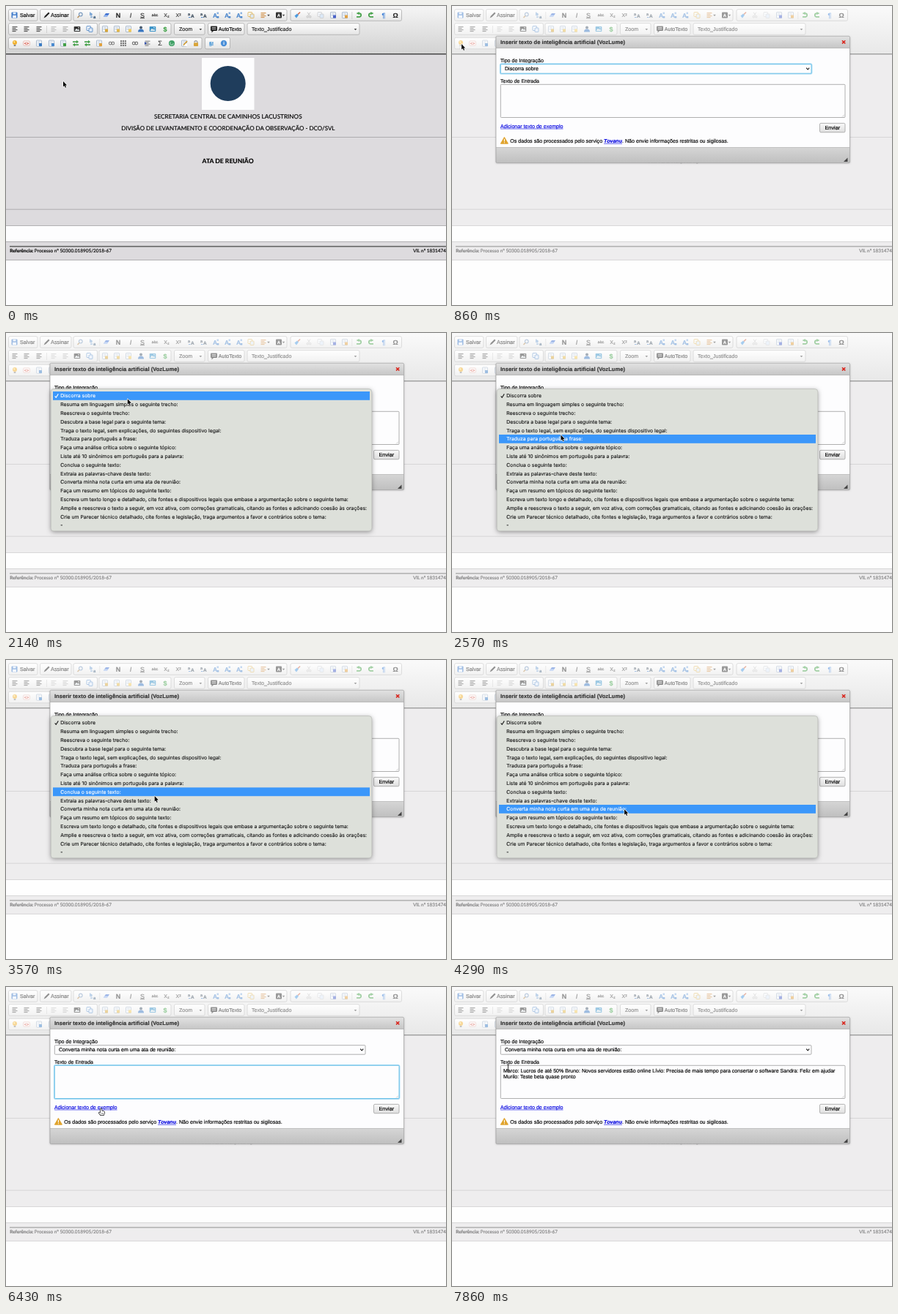
Write an HTML page with a canvas that moves like this. It is 600x409 px and loops after 8000 ms.

```html
<!DOCTYPE html>
<html lang="pt-BR">
<head>
<meta charset="utf-8">
<title>Editor</title>
<style>
html, body { margin: 0; width: 100%; height: 100%; overflow: hidden; background: #fdfdfe; }
canvas { display: block; width: 600px; height: 409px; }
</style>
</head>
<body>
<canvas id="stage"></canvas>
<script>
const W = 600, H = 409, LOOP = 8000, STEP = 1000 / 7;
const SANS = '"Liberation Sans", Arial, sans-serif';
const MENU = 'Inter, sans-serif';
const DOC = 'Lato, sans-serif';

const canvas = document.getElementById('stage');
const ctx = canvas.getContext('2d');
const dpr = window.devicePixelRatio || 1;
canvas.width = W * dpr;
canvas.height = H * dpr;
ctx.textRendering = 'geometricPrecision';
ctx.lineJoin = 'round';

const OPEN = 860, MENU_ON = 2140, MENU_OFF = 4710, CHOSEN = 5000, FILLED = 6710;

// time, x, y of the pointer hot spot
const PATH = [
  [0, 78, 103], [140, 78, 103], [570, 13, 52], [860, 13, 52],
  [1570, 169, 81], [2000, 169, 81], [2570, 148.5, 139.5], [3140, 170, 168],
  [4000, 235, 204], [4860, 235.5, 204.5], [5290, 235.5, 204.5],
  [6290, 129, 166.5], [6860, 129, 166.5], [7570, 76.5, 110], [8000, 76.5, 110]
];

const OPTIONS = [
  'Discorra sobre',
  'Resuma em linguagem simples o seguinte trecho:',
  'Reescreva o seguinte trecho:',
  'Descubra a base legal para o seguinte tema:',
  'Traga o texto legal, sem explicações, do seguintes dispositivo legal:',
  'Traduza para português a frase:',
  'Faça uma análise crítica sobre o seguinte tópico:',
  'Liste até 10 sinônimos em português para a palavra:',
  'Conclua o seguinte texto:',
  'Extraia as palavras-chave deste texto:',
  'Converta minha nota curta em uma ata de reunião:',
  'Faça um resumo em tópicos do seguinte texto:',
  'Escreva um texto longo e detalhado, cite fontes e dispositivos legais que embase a argumentação sobre o seguinte tema:',
  'Amplie e reescreva o texto a seguir, em voz ativa, com correções gramaticais, citando as fontes e adicinando coesão às orações:',
  'Crie um Parecer técnico detalhado, cite fontes e legislação, traga argumentos a favor e contrários sobre o tema:',
  '-'
];

const ROWS = [
  [12.5, `101 lens #7d9cc0;118 swap #3f7fc4;137 eraser #3d6fd0;153 N #222 bold;170 I #333 italic;
    186 S #333 under;203 abc #444 strike;219 X₂ #333;235 X² #333;252 pair #345;269 pair #345;
    286 style #4a86cc;302 style #4a86cc;318 style #4a86cc;334 copy #e0b04a;351 lines #d08a3c;372 box #333;
    397 brush #4c9be0;413 cut #ccc;429 copy #ccc;446 page #4a62c8;462 page #e0a040;
    481 undo #43a047;498 redo #43a047;515 ¶ #3d7fd6;531 Ω #222 bold`],
  [31.5, `12 lines #444;28 lines #444;45 lines #444;65 lines #bbb;81 lines #aaa;97 pic #333;114 copy #4a80c0;
    135 page #d6a63a;151 page #e2b84c;167 page #f0c95c;184 person #3b78c2;200 pic #3c94c8;217 $ #3da045 bold`],
  [51, `12 bulb #f0b030;28 tag #d04a3a;45 page #3b7cc4;62 page #4a8bd0;78 page #43a047;95 cycle #43a047;
    111 cycle #43a047;127 page #e2a13c;144 chain #888;160 grid #777;176 chain #777;193 indent #3050b0;
    210 Σ #333;226 ball #3fa065;243 pen #d09a30;259 lock #d9a53a;280 §! #2a86d0 bold;297 info #4a8fd8`]
].map(([y, list]) => [y, list.split(';').map(s => s.trim().split(' '))]);

// a hairline stroke gives the slightly heavy screen rendering
function text(s, x, y, size, color = '#000', font = SANS, style = '', align = 'left') {
  ctx.font = `${style} ${size}px ${font}`;
  ctx.fillStyle = ctx.strokeStyle = color;
  ctx.lineWidth = 0.16;
  ctx.textAlign = align;
  ctx.fillText(s, x, y + size * 0.36);
  ctx.strokeText(s, x, y + size * 0.36);
  return ctx.measureText(s).width;
}

function rect(x, y, w, h, color) {
  ctx.fillStyle = color;
  ctx.fillRect(x, y, w, h);
}

function shade(y, h, top, bottom) {
  const g = ctx.createLinearGradient(0, y, 0, y + h);
  g.addColorStop(0, top);
  g.addColorStop(1, bottom);
  return g;
}

function box(x, y, w, h, r, fill, stroke, line = 0.8) {
  ctx.beginPath();
  ctx.roundRect(x, y, w, h, r);
  ctx.fillStyle = fill;
  ctx.fill();
  if (!stroke) return;
  ctx.strokeStyle = stroke;
  ctx.lineWidth = line;
  ctx.stroke();
}

function poly(points, fill, stroke, line = 1) {
  ctx.beginPath();
  for (let i = 0; i < points.length; i += 2) ctx.lineTo(points[i], points[i + 1]);
  if (fill) ctx.closePath();
  if (stroke) {
    ctx.strokeStyle = stroke;
    ctx.lineWidth = line;
    ctx.stroke();
  }
  if (fill) {
    ctx.fillStyle = fill;
    ctx.fill();
  }
}

function disc(x, y, r, fill) {
  ctx.beginPath();
  ctx.arc(x, y, r, 0, 7);
  ctx.fillStyle = fill;
  ctx.fill();
}

function ring(x, y, r, color, from = 0, to = 7, line = 1.2) {
  ctx.beginPath();
  ctx.arc(x, y, r, from, to);
  ctx.strokeStyle = color;
  ctx.lineWidth = line;
  ctx.stroke();
}

// icons are drawn around 0,0
const ICONS = {
  lens(c) { ring(0.8, -1, 2.3, c); poly([-1, 1, -3.5, 3.5], null, '#b58b55', 1.4); },
  swap(c) { text('b', -4, -1.5, 6, c, SANS, 'bold'); text('a', 1, 2, 6, '#357', SANS, 'bold'); poly([-3, 2.5, 0, 2.5], null, c); },
  pair(c) { text('a', -4, -1.5, 5.5, c, SANS, 'bold'); text('A', 0, 1.2, 6.5, c, SANS, 'bold'); rect(-3, 2.5, 2.5, 1, '#4a86cc'); },
  style(c) { text('A', -1, 0.5, 8.5, c, SANS, 'bold', 'center'); rect(1.5, -4, 2.5, 2.5, '#8ab2e2'); rect(1.5, 1.5, 2.8, 2.5, c); },
  eraser(c) { poly([-4, 2, -1, -2.5, 4, -2.5, 1, 2], c); poly([-4, 2, -2.5, 0, 2.3, 0, 1, 2], '#9dbcf0'); },
  page(c) {
    box(-3.5, -4, 7, 8, 0.6, '#fafcff', '#8aa0b8', 0.7);
    for (let i = 0; i < 3; i++) rect(-2.3, -2.5 + i * 1.7, 4.5, 0.6, '#a9b9cb');
    rect(0, 0, 4, 4, c);
  },
  copy(c) { box(-4, -4, 5.5, 6, 0.6, '#f3f7fc', c); box(-1, -1.5, 5, 5.5, 0.6, '#dbe8f7', c); },
  lines(c) { for (let i = 0; i < 4; i++) rect(-3.5, -3.4 + i * 2, i % 2 ? 5 : 7, 1, c); },
  indent(c) { ICONS.lines('#777'); poly([-4, -2, -1, 0, -4, 2], c); },
  box(c) { box(-4, -4, 8, 8, 1, c); text('A', 0, 0, 6, '#fff', SANS, 'bold', 'center'); },
  brush(c) { poly([-3.5, 1, 0, -2, 2, 0, -1, 4], c); poly([1, -1, 4, -4], null, '#d06b4c', 1.6); },
  cut(c) { ring(-1.8, 2.2, 1.2, c); ring(1.8, 2.2, 1.2, c); poly([-1.5, 1, 2, -4], null, c); poly([1.5, 1, -2, -4], null, c); },
  undo(c) { ring(0.8, 0, 2.4, c, -1.6, 1.6, 1.7); rect(-3, 1.55, 4, 1.7, c); poly([0.8, -4.6, 0.8, -0.4, -3.5, -2.4], c); },
  redo(c) { ctx.scale(-1, 1); ICONS.undo(c); },
  cycle(c) {
    for (let i = 0; i < 2; i++) {
      rect(-4, -2.8, 5, 1.6, c);
      poly([1, -4.2, 1, 0.2, 4.2, -2], c);
      ctx.rotate(Math.PI);
    }
  },
  pic(c) { box(-4.3, -3.5, 8.6, 7, 0.7, c); poly([-3.5, 2.6, -1, -0.8, 0.7, 1, 2, 0, 3.6, 2.6], '#e8eef0'); disc(2, -1.7, 0.8, '#fff'); },
  person(c) { disc(0, -2, 2, '#4b5d70'); ctx.beginPath(); ctx.arc(0, 4, 4, Math.PI, 0); ctx.fillStyle = c; ctx.fill(); },
  bulb(c) { disc(0, -1, 3, c); disc(-0.7, -1.8, 1, '#fff2b0'); rect(-1.3, 2, 2.6, 2, '#888'); },
  tag(c) { box(-4.3, -3, 8.6, 6, 1, '#fff', '#e0a9a0'); text('<>', 0, 0, 5.5, c, SANS, 'bold', 'center'); },
  chain(c) { ring(-1.8, 0, 1.8, c); ring(1.8, 0, 1.8, c); },
  grid(c) { for (let i = 0; i < 9; i++) rect(-4 + i % 3 * 2.9, -4 + Math.floor(i / 3) * 2.9, 2.1, 2.1, c); },
  ball(c) { disc(0, 0, 4, c); ring(0, 0, 2.2, '#cfe8df', 0, 4, 0.8); },
  pen(c) { ICONS.page('#fff'); poly([-1, 2.5, 4, -3], null, c, 1.7); },
  lock(c) { ring(0, -1.2, 2.1, '#999', Math.PI, 7); box(-3, -0.8, 6, 4.8, 0.7, c); },
  info(c) { disc(0, 0, 4.2, c); text('i', 0, 0, 6, '#fff', SANS, 'bold', 'center'); }
};

function icon(x, y, kind, color, style) {
  ctx.save();
  ctx.translate(x, y);
  if (ICONS[kind]) ICONS[kind](color);
  else {
    const face = style === 'bold' || style === 'italic' ? style : '';
    text(kind, 0, 0, kind.length > 2 ? 5.2 : kind.length > 1 ? 7 : 9, color, SANS, face, 'center');
    if (style === 'under') rect(-3, 3.8, 6, 0.8, color);
    if (style === 'strike') rect(-4.5, 0.4, 9, 0.6, color);
  }
  ctx.restore();
}

function group(x, y, w) {
  box(x, y - 7.8, w, 15.6, 2, shade(y - 8, 16, '#fff', '#e4e4e4'), '#adadad');
}

function caret(x, y) {
  poly([x - 1.8, y - 0.9, x + 1.8, y - 0.9, x, y + 1.3], '#444');
}

function toolbar() {
  rect(0, 0, W, 65, shade(0, 65, '#f5f5f5', '#d2d2d2'));
  rect(0, 65, W, 1.4, '#3c3c3c');
  [[3.5, 39.5], [46.5, 42.5], [92, 291], [388, 151.5]].forEach(([x, w]) => group(x, 12.5, w));
  [[3.5, 121], [127, 98], [229.5, 41.5], [275.5, 49.5], [329, 153]].forEach(([x, w]) => group(x, 31.5, w));
  [[3.5, 263.5], [271.5, 34]].forEach(([x, w]) => group(x, 51, w));
  rect(127.5, 8, 0.7, 10, '#c4c4c4');
  rect(471.5, 8, 0.7, 10, '#c4c4c4');
  rect(55, 27, 0.7, 10, '#c4c4c4');

  box(7.5, 8.5, 8, 8, 1, '#3c78c8');
  rect(9.5, 8.8, 4, 2.6, '#dbe9fa');
  rect(9, 12.8, 5, 3.5, '#f4f8fd');
  text('Salvar', 19, 12.5, 7.2);
  poly([51.5, 16.5, 53, 13.5, 58, 8.5, 59.5, 10, 54.5, 15], '#222');
  text('Assinar', 61, 12.5, 7.4);

  ROWS.forEach(([y, list]) => list.forEach(([x, ...rest]) => icon(+x, y, ...rest)));
  caret(358, 12.7);
  caret(378.5, 12.7);
  text('Zoom', 236, 31.5, 7.1, '#222');
  caret(265.3, 32);
  box(279, 27.5, 9, 6.5, 1, '#222');
  poly([280.5, 33, 280.5, 36.5, 284, 33], '#222');
  rect(280.7, 29.3, 5.6, 0.7, '#fff');
  rect(280.7, 31.2, 5.6, 0.7, '#fff');
  text('AutoTexto', 289.7, 31.5, 7.1);
  text('Texto_Justificado', 335, 31.5, 7.1, '#222');
  caret(476.5, 32);
}

function page() {
  rect(0, 0, W, H, '#fdfdfe');
  rect(0, 66, W, 281, '#dddbde');
  rect(0, 300, W, 22.5, '#fdfdfe');
  [179, 277.7, 300, 322, 347].forEach(y => rect(0, y, W, 0.9, '#a9a8aa'));
  rect(5, 328, W, 1.8, '#747474');

  rect(267, 71, 71.5, 71, '#fdfdfe');
  disc(302.7, 106, 24, '#1f3d5c');
  text('SECRETARIA CENTRAL DE CAMINHOS LACUSTRINOS', 302.8, 150.7, 8.2, '#000', DOC, '', 'center');
  text('DIVISÃO DE LEVANTAMENTO E COORDENAÇÃO DA OBSERVAÇÃO - DCO/SVL', 302.8, 166.7, 8, '#000', DOC, '', 'center');
  text('ATA DE REUNIÃO', 302.6, 211.5, 8.6, '#000', DOC, 'bold', 'center');

  const w = text('Referência: ', 5.3, 335, 6.45, '#000', DOC, 'bold');
  text('Processo nº 50300.018905/2018-67', 5.3 + w, 335, 6.45, '#000', DOC);
  text('VIL nº 1831474', 600, 335, 6.45, '#000', DOC, '', 'right');
}

function field(x, y, w, h, focus) {
  if (focus) box(x - 0.3, y - 0.3, w + 0.6, h + 0.6, 1.5, '#fff', '#a9dcf5', 2.2);
  box(x, y, w, h, 1, '#fdfdfe', focus ? '#55b5e3' : '#9c9c9c', 0.8);
}

function link(s, x, y, style) {
  const w = text(s, x, y, 7.1, '#0000e0', SANS, style);
  rect(x, y + 3.5, w, 0.6, '#0000e0');
  return w;
}

function dialog(t) {
  const x0 = 60, y0 = 41.3, w = 482.5, h = 173.2;
  ctx.save();
  ctx.shadowColor = 'rgba(0,0,0,.35)';
  ctx.shadowBlur = 2.5 * dpr;
  ctx.shadowOffsetY = 0.6 * dpr;
  box(x0, y0, w, h, 1.5, '#fdfdfe');
  ctx.restore();
  rect(x0, y0, w, 16, shade(y0, 16, '#e2e2e2', '#c6c6c6'));
  rect(x0, 57, w, 0.7, '#a5a5a5');
  rect(x0, 193.3, w, 21.2, shade(193, 21, '#d6d6d6', '#c0c0c0'));
  rect(x0, 193, w, 0.7, '#b5b5b5');
  box(x0, y0, w, h, 1.5, 'transparent', '#a2a2a2', 0.7);
  poly([539.5, 207.5, 539.5, 213, 534, 213], '#444');

  text('Inserir texto de inteligência artificial (VozLume)', 66, 49.2, 7.6, '#333', SANS, 'bold');
  poly([532, 47.2, 536.3, 51.4], null, '#d9251c', 1.5);
  poly([536.3, 47.2, 532, 51.4], null, '#d9251c', 1.5);

  const chosen = t >= CHOSEN, filled = t >= FILLED;
  text('Tipo de Integração', 66, 74.6, 7.1);
  field(66.3, 79.7, 423.7, 12.5, !chosen);
  text(OPTIONS[chosen ? 10 : 0], 72, 85.7, 7.05);
  poly([483.2, 84.7, 485.2, 87, 487.2, 84.7], null, '#111', 1.1);

  text('Texto de Entrada', 66, 102.5, 7);
  field(66.3, 107.3, 469.7, 45.2, chosen && !filled);
  poly([535, 148.5, 532, 151.5], null, '#aaa', 0.5);
  poly([535, 150.3, 533.8, 151.5], null, '#aaa', 0.5);
  if (filled) {
    text('Marco: Lucros de até 50% Bruno: Novos servidores estão online Lívio: Precisa de mais tempo para consertar o software Sandra: Feliz em ajudar', 70, 114, 7.05);
    text('Murilo: Teste beta quase pronto', 70, 122, 7.05);
  }

  link('Adicionar texto de exemplo', 66, 164.2, '');
  box(501.5, 160.4, 34.5, 12.4, 1.5, shade(160, 13, '#fafafa', '#dedede'), '#a0a0a0');
  text('Enviar', 518.8, 166.4, 7.3, '#000', SANS, '', 'center');

  poly([71.4, 179.5, 76.4, 188.2, 66.4, 188.2], '#e0a32c', '#e0a32c', 1);
  rect(70.9, 181.8, 1.1, 3.6, '#fff');
  rect(70.9, 186.3, 1.1, 1.1, '#fff');
  let x = 79.3;
  x += text('Os dados são processados pelo serviço ', x, 184.4, 7.1);
  x += link('Tovanu', x, 184.4, 'italic bold');
  text('. Não envie informações restritas ou sigilosas.', x, 184.4, 7.1);
}

function menu(py) {
  ctx.save();
  ctx.shadowColor = 'rgba(0,0,0,.4)';
  ctx.shadowBlur = 6 * dpr;
  ctx.shadowOffsetY = 1.5 * dpr;
  box(61.3, 76.5, 437.5, 194.3, 4, '#dde0da');
  ctx.restore();
  box(61.3, 76.5, 437.5, 194.3, 4, '#dde0da', '#b4b6b2', 0.6);

  const active = Math.round((py - 86) / 11.8);
  OPTIONS.forEach((s, i) => {
    const y = 86 + i * 11.8;
    const color = i === active ? '#fff' : '#1c1c1c';
    if (i === active) rect(64, y - 6, 432, 11.8, '#3b97fa');
    text(s, 74.3, y, 6.85, color, MENU);
    if (!i) poly([66.7, y + 0.3, 68.3, y + 2.3, 71.3, y - 2.6], null, color, 1.1);
  });
}

function pointerAt(t) {
  const i = Math.max(1, PATH.findIndex(p => p[0] > t));
  const [t0, x0, y0] = PATH[i - 1], [t1, x1, y1] = PATH[i];
  const k = (t - t0) / (t1 - t0), e = k * k * (3 - 2 * k);
  return [x0 + (x1 - x0) * e, y0 + (y1 - y0) * e];
}

const CURSORS = {
  arrow() {
    poly([0, 0, 0, 7.6, 1.7, 6.1, 2.9, 8.8, 4.1, 8.3, 2.9, 5.6, 5.2, 5.5], '#000', '#fff', 1.2);
  },
  hand() {
    poly([0, 0, 1.3, 0, 1.5, 3, 3, 3.2, 5, 4, 5.2, 6, 4.2, 8.8, 0, 8.8, -2.3, 5.8, -1.6, 5, -0.2, 5.8], '#fff', '#111', 1.3);
    for (let i = 0; i < 3; i++) rect(0.6 + i * 1.3, 5.6, 0.5, 2, '#333');
  },
  beam() {
    poly([0, -3.8, 0, 3.8], null, '#222', 0.9);
    rect(-1.7, -4.4, 3.4, 0.8, '#222');
    rect(-1.7, 3.6, 3.4, 0.8, '#222');
  }
};

function cursor(x, y, t, listed) {
  let kind = 'arrow';
  if (t >= OPEN && !listed) {
    if (x > 66 && x < 536 && y > 107 && y < 153) kind = 'beam';
    if (x > 66 && x < 151 && y > 160 && y < 169) kind = 'hand';
  }
  ctx.save();
  ctx.translate(x, y);
  CURSORS[kind]();
  ctx.restore();
}

function draw(now) {
  const t = Math.floor((now % LOOP + 4) / STEP) * STEP % LOOP + 4;
  const [x, y] = pointerAt(t - 4);
  const listed = t >= MENU_ON && t < MENU_OFF;
  ctx.setTransform(dpr, 0, 0, dpr, 0, 0);
  page();
  toolbar();
  if (t >= OPEN) {
    rect(0, 0, W, H, 'rgba(255,255,255,.5)');
    dialog(t);
  }
  if (listed) menu(y);
  cursor(x, y, t, listed);
}

const start = performance.now();
function tick() {
  draw(performance.now() - start);
  requestAnimationFrame(tick);
}
tick();
</script>
</body>
</html>
```
